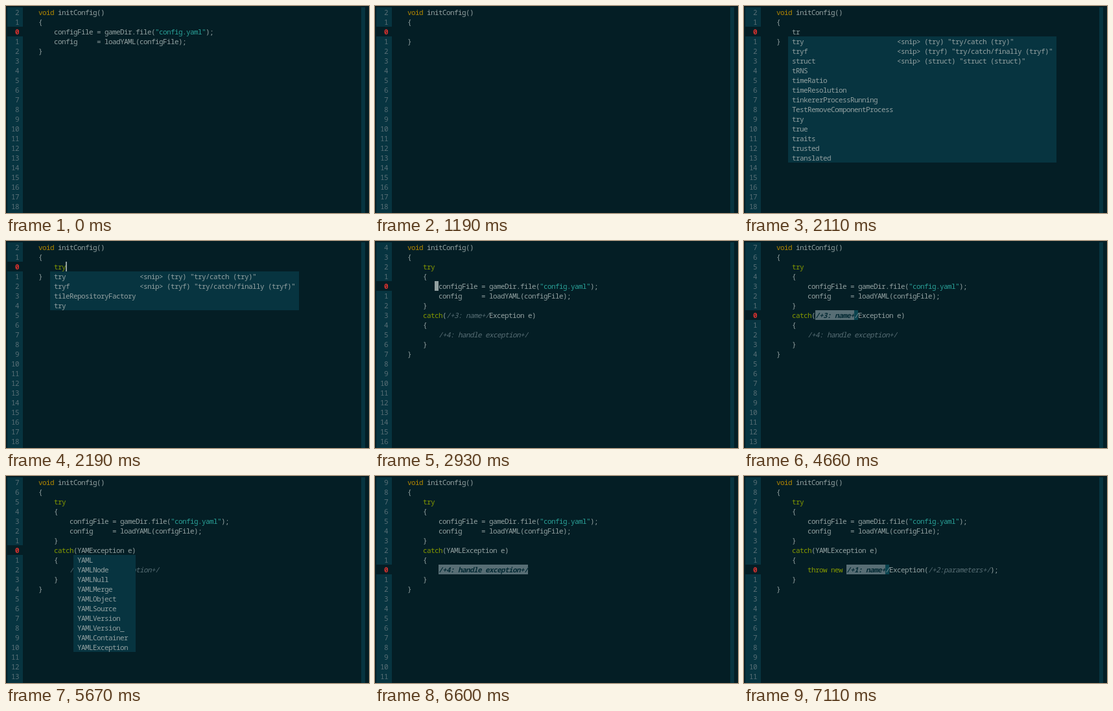
An HTML page that plays this animation: 560x320 px, repeating every 8000 ms.

```html
<!DOCTYPE html>
<html lang="en">
<head>
<meta charset="utf-8">
<title>Editor snippets</title>
<style>
html, body { margin: 0; width: 100%; height: 100%; overflow: hidden; background: #041e25; }
#stage { position: relative; width: 560px; height: 320px; overflow: hidden; background: #041e25;
  font: 11px/15px "Noto Sans Mono", "DejaVu Sans Mono", monospace; letter-spacing: -.6px;
  font-variant-ligatures: none; color: #93a1a1; }
#stage div { position: absolute; white-space: pre; height: 15px; }
#stage .panel { top: 2px; height: 318px; background: #073440; }
.type { color: #b58900; }
.key { color: #859900; }
.str { color: #2aa198; }
.note { color: #586e75; font-style: italic; }
.it { font-style: italic; }
.num { color: #586e75; }
.now { color: #dc322f; background: #041e25; font-weight: bold; }
.sel { color: #042a34; background: #586e75; font-weight: bold; }
.cell { color: #7d9599; background: #0a4450; }
.block { color: #041e25; background: #93a1a1; }
.bar { background: #93a1a1; }
.pop { background: #073440; }
</style>
</head>
<body>
<div id="stage">
  <div class="panel" style="left:2px;width:24px"></div>
  <div class="panel" style="left:548px;width:6px"></div>
  <div id="view" style="left:0;top:0"></div>
</div>
<script>
const LOOP = 8000, CW = 6, RH = 15, LEFT = 26, TOP = 2, ROWS = 21;
const view = document.getElementById('view');

const load = indent => ['configFile = gameDir.file("config.yaml");',
  'config     = loadYAML(configFile);'].map(s => ' '.repeat(indent) + s);
const wrap = lines => ['    void initConfig()', '    {', ...lines, '    }'];
const guarded = (arg, body) => wrap(['        try', '        {', ...load(12), '        }',
  `        catch(${arg}Exception e)`, '        {', ' '.repeat(12) + body, '        }']);

const NAME = '/+3: name+/', HANDLE = '/+4: handle exception+/';
const plain = wrap(load(8));
const typed = s => wrap([s && ' '.repeat(8) + s]);
const caught = arg => guarded(arg, HANDLE);
const body = s => guarded('YAML', s);
const thrown = body('throw new /+1: name+/Exception(/+2:parameters+/);');

// Completion menus: entries are "word" or "word|description"
const snip = (word, text) => `${word}|<snip> (${word}) "${text} (${word})"`;
const menu = (row, col, first, words) => ({ row, col, items: [...first, ...words.split(' ')] });
const trySnips = [snip('try', 'try/catch'), snip('tryf', 'try/catch/finally')];
const trMenu = menu(3, 7, [...trySnips, snip('struct', 'struct')],
  'tRNS timeRatio timeResolution tinkererProcessRunning TestRemoveComponentProcess try true traits trusted translated');
const tryMenu = menu(3, 7, trySnips, 'tileRepositoryFactory try');
const yamlMenu = menu(8, 13, [],
  'YAML YAMLNode YAMLNull YAMLMerge YAMLObject YAMLSource YAMLVersion YAMLVersion_ YAMLContainer YAMLException');
const throwSnip = [snip('throw', 'throw')];
const thrWords = 'throw through three threads threadID threadCount threshold thrown threadRemaining';
const thMenu = menu(10, 11, throwSnip, thrWords + ' this then');
const thrMenu = menu(10, 11, throwSnip, thrWords);

// Marks: [row, column, length, class]
const bar = (row, col) => [row, col, 0, 'bar'];
const block = (row, col) => [row, col, 1, 'block'];
const cell = (row, col) => [row, col, 1, 'cell'];
const sel = (row, col, len) => [row, col, len, 'sel'];
const line1 = sel(2, 0, 49), line2 = sel(3, 0, 42);
const inner = [sel(4, 12, 41), sel(5, 0, 46)];
const nameSel = sel(7, 14, 11), handleSel = sel(9, 12, 23), throwSel = sel(9, 22, 11);

// [time, lines, current row, marks, menu]
const steps = [
  [0, plain, 2],
  [40, plain, 2, [block(2, 24)]],
  [770, plain, 2, [line1]],
  [810, plain, 2, [line1, block(2, 24)]],
  [970, plain, 3, [line1, line2]],
  [1010, plain, 3, [line1, line2, block(3, 24)]],
  [1190, typed(''), 2],
  [1270, typed(''), 2, [bar(2, 1 / 3)]],
  [1650, typed(''), 2],
  [1690, typed('t'), 2],
  [1730, typed('t'), 2, [bar(2, 9)]],
  [1970, typed('tr'), 2],
  [2010, typed('tr'), 2, [bar(2, 10)]],
  [2110, typed('tr'), 2, [], trMenu],
  [2150, typed('try'), 2, [], tryMenu],
  [2190, typed('try'), 2, [bar(2, 11)], tryMenu],
  [2930, caught(NAME), 4, [block(4, 11)]],
  [2970, caught(NAME), 5],
  [3010, caught(NAME), 5, inner],
  [3050, caught(NAME), 5, [...inner, cell(5, 45)]],
  [4030, caught(NAME), 5, inner],
  [4070, caught(NAME), 5],
  [4150, caught(NAME), 5, [bar(5, 46)]],
  [4580, caught(NAME), 7],
  [4620, caught(NAME), 7, [nameSel]],
  [4660, caught(NAME), 7, [nameSel, cell(7, 24)]],
  [5250, caught(NAME), 7, [nameSel]],
  [5290, caught('Y'), 7],
  [5330, caught('Y'), 7, [bar(7, 15)]],
  [5420, caught('YA'), 7],
  [5460, caught('YA'), 7, [], yamlMenu],
  [5500, caught('YA'), 7, [bar(7, 16)], yamlMenu],
  [5590, caught('YAM'), 7, [], yamlMenu],
  [5710, caught('YAML'), 7, [], yamlMenu],
  [5750, caught('YAML'), 7, [bar(7, 18)], yamlMenu],
  [5980, caught('YAML'), 9, [handleSel]],
  [6020, caught('YAML'), 9, [handleSel, cell(9, 34)]],
  [6600, caught('YAML'), 9, [handleSel]],
  [6640, body('t'), 9],
  [6680, body('t'), 9, [bar(9, 13)]],
  [6740, body('th'), 9],
  [6780, body('th'), 9, [], thMenu],
  [6860, body('thr'), 9, [], thrMenu],
  [6900, body('thr'), 9, [bar(9, 15)], thrMenu],
  [7070, thrown, 9, [throwSel]],
  [7110, thrown, 9, [throwSel, cell(9, 32)]]
];

const esc = s => s.replace(/&/g, '&amp;').replace(/</g, '&lt;');
const box = (row, col, width, cls, html) =>
  `<div class="${cls}" style="left:${LEFT + col * CW}px;top:${TOP + row * RH}px;width:${width}px">${html}</div>`;

const token = /(\/\+.*?\+\/)|("[^"]*")|\b(void)\b|\b(try|catch|throw|new)\b/g;
const paint = s => s.replace(token, (m, note, str, type) =>
  `<span class="${note ? 'note' : str ? 'str' : type ? 'type' : 'key'}">${m}</span>`);

function drawMark(lines, [row, col, len, cls]) {
  if (!len) return box(row, col, 2, cls, '');
  const italic = lines[row].includes('/+') ? ' it' : '';
  return box(row, col, len * CW, cls + italic, esc(lines[row].slice(col, col + len)));
}

function drawMenu({ row, col, items }) {
  const pairs = items.map(s => s.split('|'));
  const longest = i => Math.max(...pairs.map(p => (p[i] || '').length));
  const wordCols = longest(0) + 1, cols = wordCols + longest(1) + 2;
  return pairs.map(([word, text = ''], i) =>
    box(row + i, col, cols * CW, 'pop', esc(' ' + word.padEnd(wordCols) + text))).join('');
}

function draw([, lines, current, marks = [], list]) {
  let html = '';
  for (let row = 0; row < ROWS; row++) {
    const n = String(Math.abs(row - current)).padStart(3);
    html += box(row, -4, 24, row === current ? 'now' : 'num', n);
  }
  lines.forEach((s, row) => { html += box(row, 0, 520, '', paint(esc(s))); });
  marks.forEach(m => { html += drawMark(lines, m); });
  if (list) html += drawMenu(list);
  view.innerHTML = html;
}

const start = performance.now();
let shown;
function tick() {
  const t = (performance.now() - start) % LOOP;
  const step = steps.findLast(s => s[0] <= t) || steps[0];
  if (step !== shown) draw(shown = step);
  requestAnimationFrame(tick);
}
tick();
</script>
</body>
</html>
```
